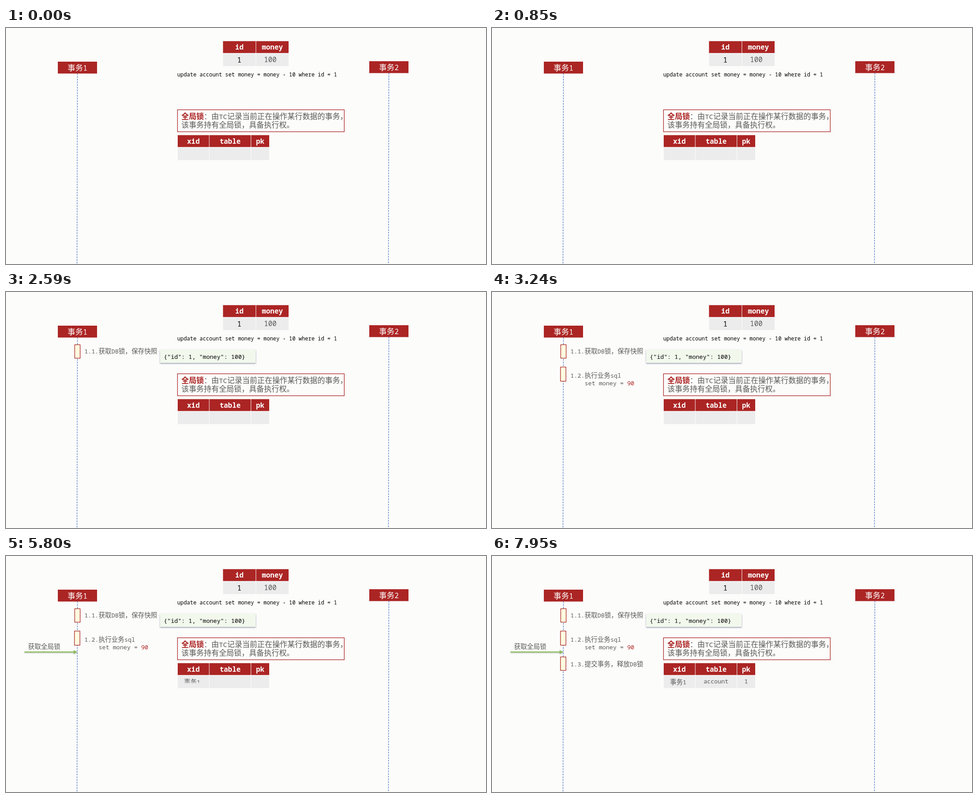
Animation, 1065 px wide and 526 px high, one loop 7990 ms. Source, as an HTML page:

```html
<!DOCTYPE html>
<html lang="zh-CN">
<head>
<meta charset="utf-8">
<title>全局锁</title>
<style>
  html, body { margin: 0; width: 100%; height: 100%; overflow: hidden; background: #fcfcfb; }
  svg { display: block; width: 1065px; height: 526px; }
  text { font-family: "Noto Sans Mono", monospace; white-space: pre; text-spacing-trim: space-all; }
  .cjk { font-family: "Noto Sans CJK SC", "Noto Sans CJK", sans-serif; }
</style>
</head>
<body>
<svg id="stage" viewBox="0 0 1065 526">
  <defs>
    <filter id="shadow" x="-10%" y="-40%" width="120%" height="200%">
      <feDropShadow dx="0" dy="1.5" stdDeviation="1.5" flood-color="#34406a" flood-opacity=".55"/>
    </filter>
    <filter id="arrowShadow" filterUnits="userSpaceOnUse" x="30" y="200" width="140" height="30">
      <feDropShadow dx="0" dy="1" stdDeviation="1" flood-color="#000" flood-opacity=".35"/>
    </filter>
  </defs>
</svg>
<script>
const LOOP = 7990;
const WIPE = 500;
const SOFT = 0.25;
const RED = '#ab2524', GREY = '#595959', CELL = '#ececec', BLUE = '#5b82c4', GREEN = '#8fbc62';
const stage = document.getElementById('stage');
const defs = stage.querySelector('defs');

function add(parent, tag, attrs = {}, content = '') {
  const el = document.createElementNS('http://www.w3.org/2000/svg', tag);
  for (const [key, value] of Object.entries(attrs)) el.setAttribute(key, value);
  el.textContent = content;
  return parent.appendChild(el);
}

// Latin runs are set a little smaller than the Chinese ones beside them.
function runs(el, str, size, attrs = {}) {
  for (const run of str.match(/[\u3000-\u9fff\uff00-\uffef]+|[^\u3000-\u9fff\uff00-\uffef]+/g)) {
    const cjk = run.charCodeAt(0) > 0x2fff;
    add(el, 'tspan', { ...attrs, 'font-size': cjk ? size : size * 0.917, class: cjk ? 'cjk' : 'mono' }, run);
  }
  return el;
}

function label(parent, x, y, str, size, fill = GREY, attrs = {}) {
  return runs(add(parent, 'text', { x, y, fill, ...attrs }), str, size);
}

function centered(parent, x, y, str, size, fill, attrs = {}) {
  return label(parent, x, y, str, size, fill, { 'text-anchor': 'middle', ...attrs });
}

function rect(parent, x, y, width, height, fill, attrs = {}) {
  return add(parent, 'rect', { x, y, width, height, fill, ...attrs });
}

function table(y, columns) {
  for (const [x, width, title] of columns) {
    rect(stage, x, y, width, 26.5, RED);
    rect(stage, x, y + 28, width, 27.5, CELL);
    centered(stage, x + width / 2, y + 19, title, 16.9, '#fff', { 'font-weight': 700 });
  }
}

function lane(x, y, title) {
  add(stage, 'line', {
    x1: x + 43.5, y1: y + 26, x2: x + 42.5, y2: 526,
    stroke: BLUE, 'stroke-width': 1.3, 'stroke-dasharray': '4 2'
  });
  rect(stage, x, y, 87, 26.5, RED);
  centered(stage, x + 43.5, y + 20, title, 17.2, '#fff');
}

function bar(parent, x, y, height) {
  rect(parent, x, y, 12, height, '#fffde0', { stroke: RED, 'stroke-width': 1.3 });
}

// Static scene
lane(115, 75, '事务1');
lane(806, 74, '事务2');

table(29.3, [[481.5, 72.5, 'id'], [555, 72, 'money']]);
centered(stage, 517.5, 77, '1', 16.8, '#000');
centered(stage, 586.3, 75.5, '100', 16.8);
label(stage, 380, 108, 'update account set money = money - 10 where id = 1', 12.9, '#000');

rect(stage, 380.5, 182.3, 370, 49, 'none', { stroke: RED, 'stroke-width': 1.3 });
const rule = add(stage, 'text', { x: 389, y: 203, fill: GREY });
runs(rule, '全局锁', 16.7, { fill: RED, 'font-weight': 700 });
runs(rule, ':由TC记录当前正在操作某行数据的事务,'.replace(':', '\uff1a').replace(',', '\uff0c'), 16.7);
label(stage, 389, 222.3, '该事务持有全局锁\uff0c具备执行权。', 16.7);
table(238.8, [[381, 69.5, 'xid'], [451.5, 91.5, 'table'], [544, 40, 'pk']]);

// Groups revealed by a soft-edged wipe along one axis
const wipes = [];
function wipe(start, axis, from, to) {
  const id = 'wipe' + wipes.length;
  const gradient = add(defs, 'linearGradient', {
    id: id + 'Edge', gradientUnits: 'userSpaceOnUse', x1: 0, y1: 0, x2: 0, y2: 0
  });
  add(gradient, 'stop', { offset: 0, 'stop-color': '#fff' });
  add(gradient, 'stop', { offset: 1, 'stop-color': '#000' });
  const mask = add(defs, 'mask', {
    id, maskUnits: 'userSpaceOnUse', x: 0, y: 0, width: 1065, height: 526
  });
  rect(mask, 0, 0, 1065, 526, `url(#${id}Edge)`);
  const group = add(stage, 'g', { mask: `url(#${id})` });
  wipes.push({ start, axis, from, to, gradient, group });
  return group;
}

const snapshot = wipe(1140, 'y', 116, 149);
bar(snapshot, 152.5, 117.5, 30);
label(snapshot, 174, 137, '1.1.获取DB锁\uff0c保存快照', 14.3);

const json = add(stage, 'g');
rect(json, 342, 129, 212, 29, '#f2f8ec', { filter: 'url(#shadow)' });
label(json, 350, 149, '{"id": 1, "money": 100}', 14.3, '#000');

const execute = wipe(2640, 'y', 166, 212);
bar(execute, 152, 167.3, 31.5);
label(execute, 174, 191.3, '1.2.执行业务sql', 14.3);
const sql = label(execute, 205.5, 208, 'set money = ', 14.3);
runs(sql, '90', 14.3, { fill: RED });

const acquire = wipe(4180, 'x', 41, 158);
label(acquire, 49, 206.8, '获取全局锁', 14.3);
const arrow = add(acquire, 'g', { filter: 'url(#arrowShadow)' });
rect(arrow, 41, 212.8, 111, 2.4, GREEN);
add(arrow, 'path', { d: 'M150 209.8L158.5 214L150 218.2Z', fill: GREEN });

centered(wipe(5520, 'y', 270, 291), 413, 285.5, '事务1', 14.3);
centered(wipe(6020, 'y', 270, 291), 497, 284.3, 'account', 14.3);
centered(wipe(6490, 'y', 270, 291), 564, 284.3, '1', 14.3);

const commit = wipe(7440, 'y', 224, 256);
bar(commit, 152, 225, 30);
label(commit, 174, 246, '1.3.提交事务\uff0c释放DB锁', 14.3);

const clamp = v => Math.min(1, Math.max(0, v));

function draw(time) {
  for (const { start, axis, from, to, gradient, group } of wipes) {
    const progress = clamp((time - start) / WIPE);
    const front = progress * (1 + SOFT);
    gradient.setAttribute(axis + '1', from + (front - SOFT) * (to - from));
    gradient.setAttribute(axis + '2', from + front * (to - from));
    group.setAttribute('visibility', progress > 0 ? 'visible' : 'hidden');
    if (progress < 1) group.setAttribute('mask', `url(#${gradient.id.replace('Edge', '')})`);
    else group.removeAttribute('mask');
  }
  json.setAttribute('opacity', clamp((time - 1690) / WIPE));
}

const begin = performance.now();
function tick() {
  draw((performance.now() - begin) % LOOP);
  requestAnimationFrame(tick);
}
tick();
</script>
</body>
</html>
```
